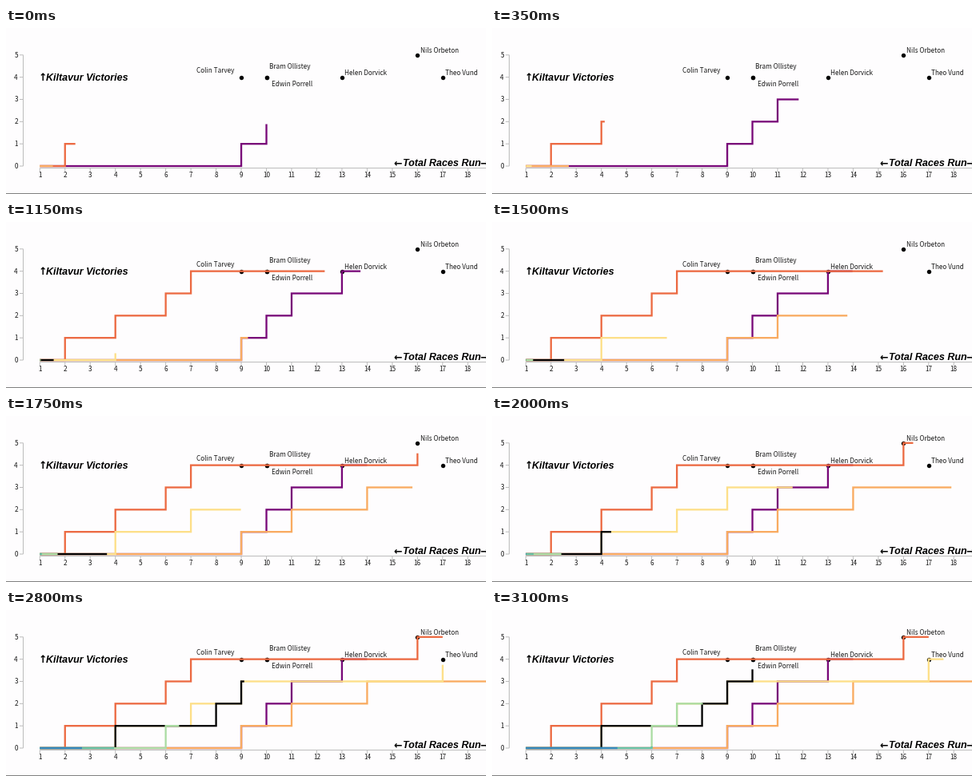
Animation, 600 px wide and 208 px high, one loop 3150 ms. Source, as a matplotlib script:

```python
import matplotlib.pyplot as plt
import numpy as np
from matplotlib.animation import FuncAnimation

W, H, DPI = 600, 208, 100
STEP, FRAMES = 50, 63
DRAW_MS = 4000
PT = 72 / DPI

LABEL_FONT = ["Noto Sans CJK JP", "DejaVu Sans"]
TITLE_FONT = ["Liberation Sans", "DejaVu Sans"]

# start time (ms), colour, races won, last race
RUNS = [
    (-2216, "#780878", [9, 10, 11, 13], 14),
    (-1216, "#ec6a42", [2, 4, 6, 7, 16], 17),
    (-716, "#f9ab60", [9, 11, 14, 20], 20),
    (-216, "#fddf88", [4, 7, 9, 17], 18),
    (284, "#000000", [4, 8, 9, 10], 11),
    (784, "#abdda4", [6, 7, 8, 9], 10),
    (1284, "#66c2a5", [6, 8, 9, 10], 11),
    (1784, "#3288bd", [20, 21, 22, 23], 23),
]

# race, victories, name, label x, label baseline
RACERS = [
    (9, 4, "Colin Tarvey", 238, 56),
    (10, 4, "Bram Ollistey", 329, 51),
    (10, 4, "Edwin Porrell", 332, 73),
    (13, 4, "Helen Dorvick", 423, 59),
    (16, 5, "Nils Orbeton", 518, 31),
    (17, 4, "Theo Vund", 549, 59),
]


def sx(race):
    return 42.3 + (race - 1) * 31.47


def sy(wins):
    return 173 - wins * 27.84


def ease(u):
    """Cubic in-out."""
    u = min(max(u, 0), 1)
    return 4 * u**3 if u < 0.5 else 1 - 4 * (1 - u) ** 3


def stairs(wins, last):
    pts = [(1, 0)]
    for n, race in enumerate(wins):
        pts += [(race, n), (race, n + 1)]
    pts.append((last, len(wins)))
    x, y = np.array(pts, float).T
    x, y = sx(x), sy(y)
    dist = np.concatenate([[0], np.cumsum(np.hypot(np.diff(x), np.diff(y)))])
    return x, y, dist


def trim(path, part):
    """The first part (0 to 1) of a path, by length."""
    x, y, dist = path
    end = part * dist[-1]
    keep = dist < end
    return (np.append(x[keep], np.interp(end, dist, x)),
            np.append(y[keep], np.interp(end, dist, y)))


fig = plt.figure(figsize=(W / DPI, H / DPI), dpi=DPI, facecolor="#fefdfe")
ax = fig.add_axes([0, 0, 1, 1])
ax.set(xlim=(0, W), ylim=(H, 0))
ax.axis("off")


def rule(x, y, color="#bcbcbc"):
    ax.plot(x, y, color=color, lw=PT, solid_capstyle="butt", snap=False, zorder=1)


def label(x, y, text, size=8.2, **style):
    style = {"color": "#1a1a1a", "family": LABEL_FONT, "zorder": 3, **style}
    ax.text(x, y, text, fontsize=size * PT, va="baseline", **style)


def title(x, y, text, family=TITLE_FONT):
    label(x, y, text, 12.5, family=family, weight="bold", style="italic",
          color="black", clip_on=True)


# Axes
rule([21.5, 21.5], [sy(5), sy(0)])
rule([sx(1), W], [175.5, 175.5])
for n in range(6):
    rule([17, 21.5], [sy(n), sy(n)])
    label(15, sy(n) + 3, str(n), ha="right")
for race in range(1, 19):
    rule([sx(race)] * 2, [175.5, 180])
    label(sx(race), 187, str(race), ha="center")
rule([0, W], [207.5, 207.5], "#808080")

title(40.5, 66, "↑", "DejaVu Sans")
title(50, 66, "Kiltavur Victories")
title(484, 173, "←", "DejaVu Sans")
title(495.5, 173, "Total Races Run")
title(592, 173, "→", "DejaVu Sans")

for race, wins, name, x, y in RACERS:
    ax.plot(sx(race), sy(wins), "o", color="black", ms=5.4 * PT, mew=0,
            snap=False, zorder=2)
    label(x, y, name)

paths = [stairs(wins, last) for _, _, wins, last in RUNS]
lines = [
    ax.plot([], [], color=color, lw=2.3 * PT, solid_capstyle="butt",
            solid_joinstyle="miter", snap=False, zorder=2.5)[0]
    for _, color, _, _ in RUNS
]


def draw(frame):
    now = frame * STEP
    for line, path, (start, *_) in zip(lines, paths, RUNS):
        part = ease((now - start) / DRAW_MS)
        line.set_data(*(trim(path, part) if part > 0 else ([], [])))
    return lines


anim = FuncAnimation(fig, draw, frames=FRAMES, interval=STEP,
                     init_func=lambda: draw(0), repeat=True, repeat_delay=0)
plt.show()
```
